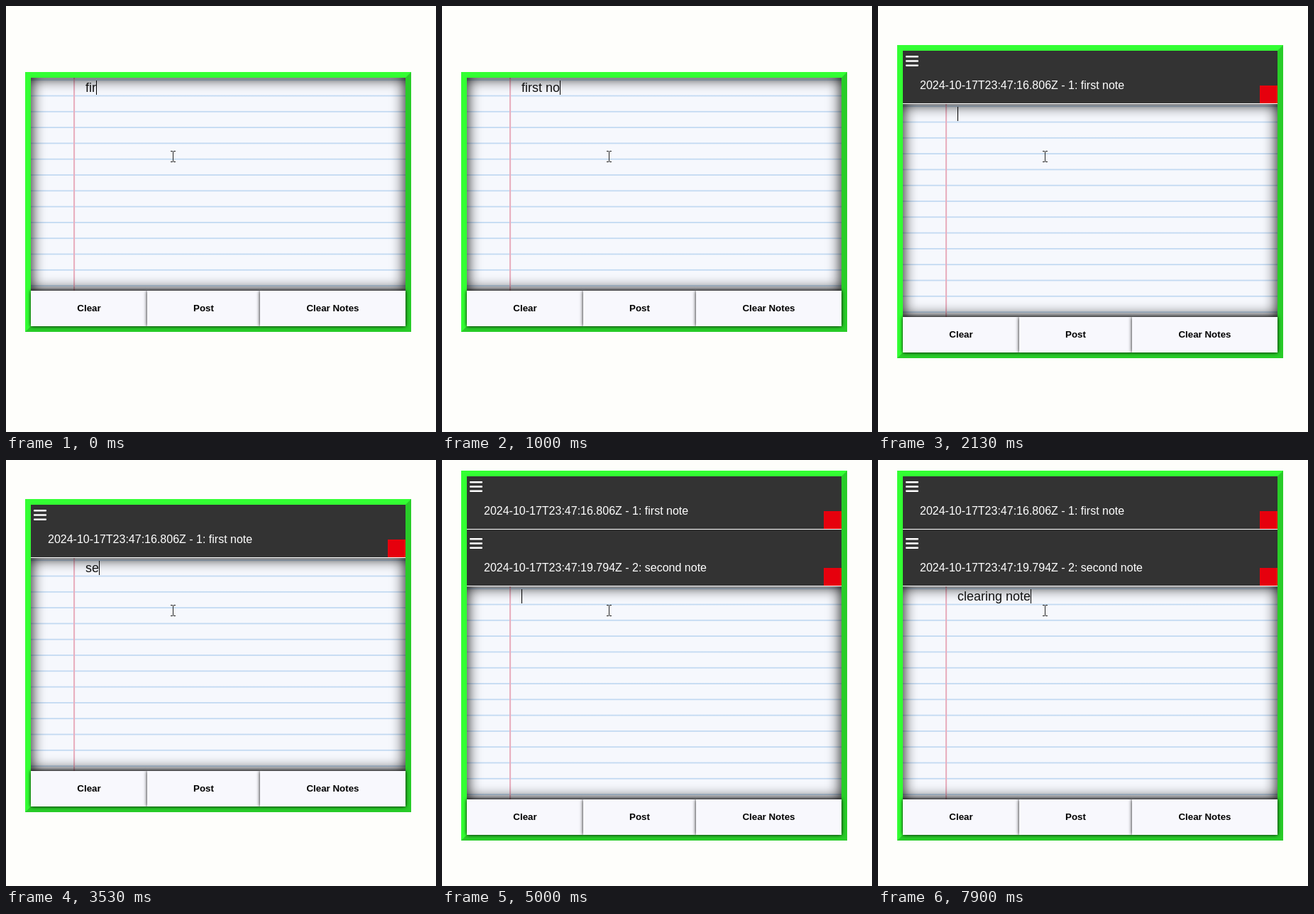
Recreate the animation shown at these times as an HTML page. Size 606x600 px, loop 8000 ms.

```html
<!DOCTYPE html>
<html lang="en">
<head>
<meta charset="utf-8">
<title>Notes</title>
<style>
  html, body { margin: 0; width: 100%; height: 100%; overflow: hidden; background: #fefefb; }
  body { position: relative; font-family: "Liberation Sans", Arial, sans-serif; }
  .frame {
    position: absolute; left: 27px; width: 528px;
    border: 8px solid; border-color: #3f3 #28cc28 #28cc28 #3f3;
  }
  .note {
    position: relative; box-sizing: border-box; height: 80px;
    background: #333; border-bottom: 1px solid #fff;
    color: #fff; font-size: 16px; line-height: 18px;
  }
  .note:first-child { height: 75px; }
  .note span { position: absolute; left: 24px; bottom: 16px; white-space: pre; }
  .note svg { position: absolute; left: 4px; bottom: 51px; }
  .note b { position: absolute; right: 0; bottom: 0; width: 25px; height: 25px; background: #e6000d; }
  .paper {
    position: relative; height: 300px;
    background:
      linear-gradient(90deg, transparent 59.6px, #e8b0c0 60.4px 61.8px, transparent 62.6px),
      repeating-linear-gradient(transparent 0 1.8px, #c3daf2 2.8px 3.6px, transparent 4.6px 22.3px),
      #f6f8fd;
    box-shadow: inset 0 0 20px #000;
  }
  .line {
    position: absolute; left: 77px; top: 4px; display: flex;
    font-size: 18px; line-height: 20px; white-space: pre; color: #111;
  }
  .caret { width: 1px; height: 20px; background: #000; }
  .buttons { position: relative; display: flex; height: 50px; }
  .buttons div {
    position: relative; background: #f8f8fd; box-shadow: 0 0 5px #000;
    font-weight: bold; font-size: 13.333px; line-height: 50px; text-align: center; color: #000;
  }
  .pointer { position: absolute; left: 231px; top: 204px; }
</style>
</head>
<body>
<div class="frame" id="frame">
  <div class="note"><span>2024-10-17T23:47:16.806Z - 1: first note</span></div>
  <div class="note"><span>2024-10-17T23:47:19.794Z - 2: second note</span></div>
  <div class="paper">
    <div class="line"><span id="draft"></span><i class="caret" id="caret"></i></div>
  </div>
  <div class="buttons">
    <div style="width:164px">Clear</div>
    <div style="width:159px">Post</div>
    <div style="width:205px">Clear Notes</div>
  </div>
</div>
<svg class="pointer" width="9" height="17" fill="none" stroke="#222">
  <path d="M1 .5H4M5 .5H8M4.5 1V15M1 15.5H4M5 15.5H8"/>
</svg>
<script>
const LOOP = 8000, BLINK = 530;
const FRAME_TOPS = [93, 55, 15];   // by number of posted notes

// Each draft opens at `start`; `keys` holds the time of every keystroke.
const drafts = [
  { start: 0, text: 'first note',
    keys: [-300, -180, -60, 130, 300, 630, 900, 1000, 1700, 1800] },
  { start: 2070, text: 'second note',
    keys: [3330, 3530, 3700, 3830, 3970, 4100, 4270, 4570, 4670, 4770, 4840] },
  { start: 5000, text: 'clearing note',
    keys: [6570, 6630, 6700, 6770, 6830, 7000, 7130, 7270, 7430, 7600, 7700, 7800, 7900] }
];
const allKeys = drafts.flatMap(d => d.keys);

const frame = document.getElementById('frame');
const draft = document.getElementById('draft');
const caret = document.getElementById('caret');
const notes = [...document.querySelectorAll('.note')];

const bars = [0, 6.2, 12.4]
  .map(y => `<rect y="${y + 1}" width="18" height="2.5" rx=".8"/>`).join('');
for (const note of notes) {
  note.insertAdjacentHTML('beforeend', `<svg width="18" height="17" fill="#fff">${bars}</svg><b></b>`);
}

function render(t) {
  const posted = drafts.filter(d => d.start <= t).length - 1;
  const { text, keys } = drafts[posted];
  frame.style.top = FRAME_TOPS[posted] + 'px';
  notes.forEach((note, i) => { note.style.display = i < posted ? 'block' : 'none'; });
  draft.textContent = text.slice(0, keys.filter(k => k <= t).length);

  const lastKey = Math.max(...allKeys.filter(k => k <= t));
  const lit = Math.floor((t - lastKey) / BLINK) % 2 === 0;
  caret.style.visibility = lit ? 'visible' : 'hidden';
}

const began = performance.now();
function tick() {
  render((performance.now() - began) % LOOP);
  requestAnimationFrame(tick);
}
render(0);
requestAnimationFrame(tick);
</script>
</body>
</html>
```
